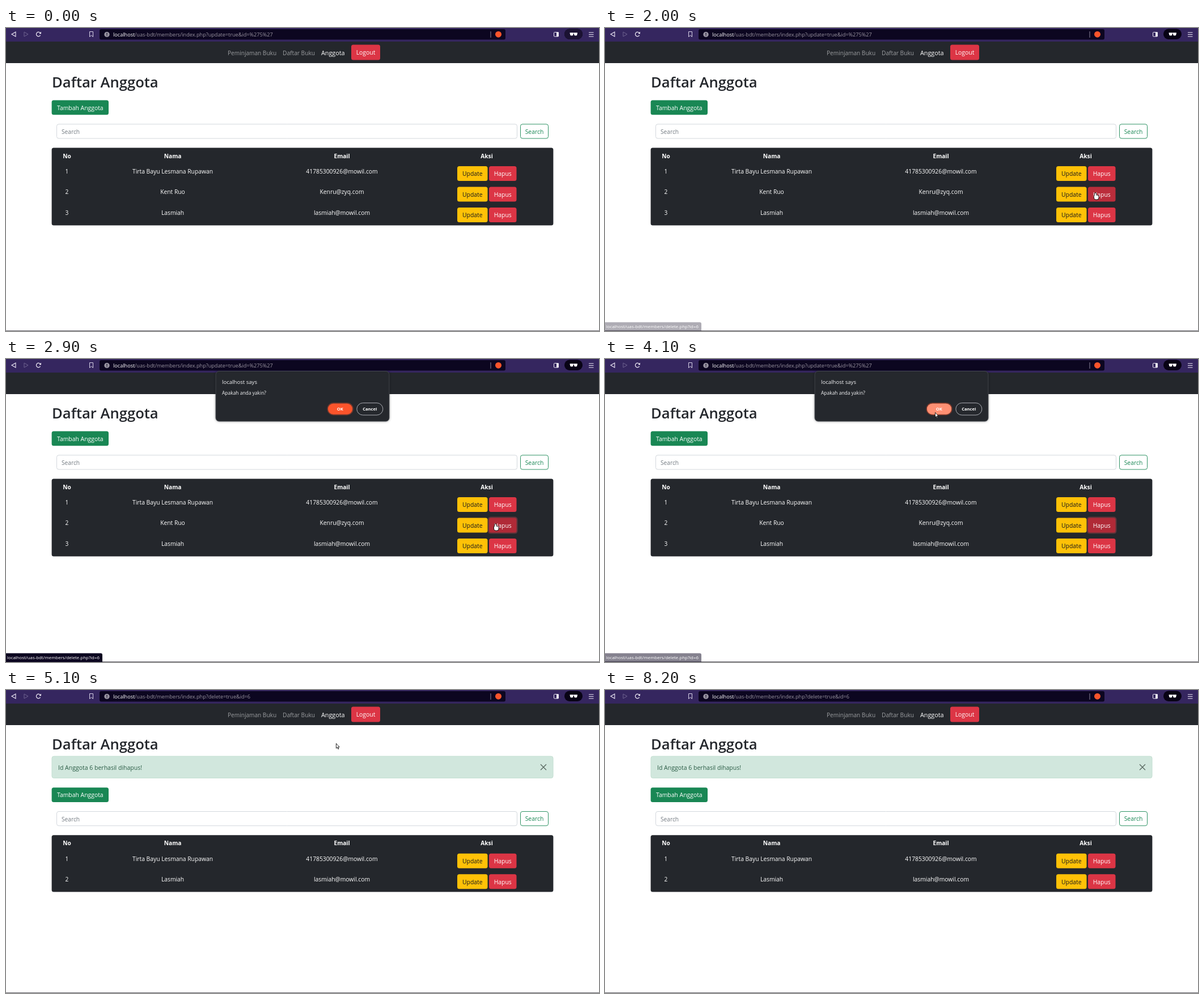
Recreate the animation shown at these times as an HTML page with a canvas. Size 1046x535 px, loop 8.4 s.

```html
<!DOCTYPE html>
<html lang="id">
<head>
<meta charset="utf-8">
<title>Daftar Anggota</title>
<style>
  html, body { margin: 0; width: 100%; height: 100%; overflow: hidden; background: #fff; }
  canvas { display: block; }
</style>
</head>
<body>
<canvas id="stage" width="1046" height="535"></canvas>
<script>
const ctx = document.getElementById('stage').getContext('2d');
const LOOP = 8400, STEP = 100;
const OVER = 1600, PRESS = 2200, CONFIRM = 4800, RELOADED = 5100;
const DARK = '#24272c', RED = '#dc3545', GREEN = '#198754';
const INK = '#0c0620', ORANGE = '#fb542b', ICON = '#eeeaf6';
const ROW = 36.5, BTN_H = 26;
const UPDATE = { label: 'Update', x: 796, w: 53.5, fill: '#ffc107', hover: '#ffca2c', color: '#17191c' };
const DELETE = { label: 'Hapus', x: 852, w: 48.5, fill: RED, hover: '#bb2d3b', color: '#fff' };
const COLS = { No: 107.5, Nama: 294, Email: 592.5, Aksi: 848 };

const members = [
  { name: 'Tirta Bayu Lesmana Rupawan', email: '41785300926@mowil.com' },
  { name: 'Kent Ruo', email: 'Kenru@zyq.com' },
  { name: 'Lasmiah', email: 'lasmiah@mowil.com' }
];

// Stops of the pointer; it slows down towards each one
const stops = [
  { t: 200, x: 28, y: -6 },
  { t: 1000, x: 228, y: 280 },
  { t: OVER, x: 866, y: 291 },
  { t: 2900, x: 862, y: 291 },
  { t: 4000, x: 582, y: 94 },
  { t: 7100, x: 582, y: 94 },
  { t: 7800, x: 48, y: 3 },
  { t: 7900, x: 48, y: 3 },
  { t: 8200, x: 61, y: -10 }
];

const ramp = (t, from, to) => Math.min(1, Math.max(0, (t - from) / (to - from)));

function pointerAt(t) {
  let { x, y } = stops[0];
  for (let i = 1; i < stops.length; i++) {
    const k = 1 - (1 - ramp(t, stops[i - 1].t, stops[i].t)) ** 2;
    x += (stops[i].x - x) * k;
    y += (stops[i].y - y) * k;
  }
  return { x, y };
}

function paint(fill, stroke, line = 1) {
  if (fill) { ctx.fillStyle = fill; ctx.fill(); }
  if (stroke) { ctx.strokeStyle = stroke; ctx.lineWidth = line; ctx.stroke(); }
}

function rect(x, y, w, h, fill) {
  ctx.fillStyle = fill;
  ctx.fillRect(x, y, w, h);
}

function box(x, y, w, h, r, fill, stroke, line) {
  ctx.beginPath();
  ctx.roundRect(x, y, w, h, r);
  paint(fill, stroke, line);
}

function path(d, fill, stroke, line = 1) {
  const p = new Path2D(d);
  if (fill) { ctx.fillStyle = fill; ctx.fill(p); }
  if (stroke) { ctx.strokeStyle = stroke; ctx.lineWidth = line; ctx.stroke(p); }
}

function disc(x, y, r, fill) {
  ctx.beginPath();
  ctx.arc(x, y, r, 0, 7);
  paint(fill);
}

function cross(x, y, r, color, line) {
  path(`M${x - r} ${y - r}L${x + r} ${y + r}M${x - r} ${y + r}L${x + r} ${y - r}`, null, color, line);
}

// y is the middle of the capital letters
function text(s, x, y, size, color, align = 'left', weight = 400) {
  ctx.font = `${weight} ${size}px "Open Sans", "Noto Sans", sans-serif`;
  ctx.textAlign = align;
  ctx.fillStyle = color;
  ctx.fillText(s, x, y + size * .357);
}

function button(label, x, y, w, h, fill, color = '#fff', stroke) {
  box(x, y, w, h, 3.5, fill, stroke, .9);
  text(label, x + w / 2, y + h / 2 + .6, 10.4, color, 'center');
}

function browserBar(t) {
  rect(0, 0, 1046, 24, '#35265f');
  path('M10 11l7 -4v8z', null, ICON, 1.1);
  path('M39 11l-7 -4v8z', null, '#6f6390');
  if (t >= CONFIRM && t < RELOADED) cross(57.5, 11, 3, ICON, 1.2);
  else {
    path('M60.6 12.8A3.8 3.8 0 1 1 60.2 8.6', null, ICON, 1.2);
    path('M62 6.6v3.7h-3.7z', ICON);
  }
  path('M147.5 6.5h6v9l-3 -2.5l-3 2.5z', null, '#d8d2e6');

  box(165, 2, 716, 18.5, 3, INK);
  disc(178, 11.4, 4.7, '#96919f');
  rect(177.4, 8.8, 1.2, 3.2, INK);
  rect(177.4, 12.9, 1.2, 1.2, INK);
  text('localhost', 189, 11.5, 9.15, '#fff');
  const query = t < RELOADED ? 'update=true&id=%275%27' : 'delete=true&id=6';
  text('/uas-bdt/members/index.php?' + query, 227, 11.5, 9.15, '#98939f');
  rect(854.5, 6, 1, 11, '#8c859c');
  disc(868.5, 11.2, 5.5, ORANGE);

  box(966.5, 7.5, 8, 7.5, 1, null, ICON);
  rect(971, 7.5, 4, 7.5, ICON);
  box(985, 1.5, 32, 18.5, 9, '#080315');
  ctx.globalAlpha = 1 - ramp(t, 100, OVER);
  box(985, 1.5, 32, 18.5, 9, '#1b1232');
  ctx.globalAlpha = 1;
  rect(994.5, 8.5, 13.5, 1.5, '#fff');
  for (const x of [995, 1002]) box(x, 8.5, 5.5, 5, [0, 0, 2.5, 2.5], '#fff');
  for (let i = 0; i < 3; i++) rect(1028, 7.5 + 3.5 * i, 8.5, 1, ICON);
}

function navbar() {
  rect(0, 24, 1046, 38, DARK);
  text('Peminjaman Buku', 391, 44, 10.1, '#9b9da0');
  text('Daftar Buku', 488, 44, 10.2, '#9b9da0');
  text('Anggota', 556, 44, 10.8, '#fff');
  button('Logout', 609, 29.5, 51, 27, RED);
}

function page(t, pointer) {
  text('Daftar Anggota', 81, 96, 25.6, DARK, 'left', 600);
  const deleted = t >= RELOADED;
  if (deleted) {
    box(81, 117, 884, 38.5, 3.5, '#d1e7dd', '#c3dfd1');
    text('Id Anggota 6 berhasil dihapus!', 92, 137, 10.5, '#2a5c45');
    cross(948, 136.3, 5, '#596760', 1.3);
  }
  ctx.save();
  if (deleted) ctx.translate(0, 44.7);
  button('Tambah Anggota', 80.6, 127.6, 100.4, 25.7, GREEN);
  box(89.5, 169.8, 812, 25.2, 3.5, '#fff', '#d3d8dd');
  text('Search', 98, 183.2, 10.2, '#747b82');
  button('Search', 907.5, 169.8, 49, 25.2, '#fff', GREEN, GREEN);

  const rows = members.filter((m, i) => !deleted || i !== 1);
  box(80.6, 211.6, 884.8, 27.3 + rows.length * ROW, 3.5, DARK);
  for (const head in COLS) text(head, COLS[head], 226, 10.2, '#fff', 'center', 700);
  rows.forEach((member, i) => memberRow(t, member, i, pointer));
  ctx.restore();
  rect(0, 534, 1046, 1, '#66636b');
}

function memberRow(t, member, i, pointer) {
  const y = 253.2 + i * ROW, top = y - 9.1;
  text(i + 1, COLS.No, y, 10.2, '#fff', 'center');
  text(member.name, COLS.Nama, y, 10.3, '#fff', 'center');
  text(member.email, COLS.Email, y, 10.3, '#fff', 'center');
  const focused = member === members[1] && t >= PRESS;
  if (focused) {
    const late = t >= CONFIRM, g = late ? 2.6 : 2;
    box(DELETE.x - g, top - g, DELETE.w + 2 * g, BTN_H + 2 * g, 5, late ? '#81404a' : '#5d343b');
  }
  for (const b of [UPDATE, DELETE]) {
    const fill = focused && b === DELETE ? '#b02a37' : over(t, b, i, pointer) ? b.hover : b.fill;
    button(b.label, b.x, top, b.w, BTN_H, fill, b.color);
  }
}

function over(t, b, row, { x, y }) {
  const dx = x - b.x, dy = y - 244.1 - row * ROW;
  return t < 3000 && dx > 0 && dx < b.w && dy > 0 && dy < BTN_H;
}

function statusBubble(t) {
  const alpha = ramp(t, 1900, PRESS) * (1 - ramp(t, 3950, 4250));
  if (!alpha) return;
  ctx.globalAlpha = alpha;
  box(0, 519.5, 170, 15.5, [0, 3, 0, 0], INK);
  ctx.globalAlpha = 1;
  text('localhost/uas-bdt/members/delete.php?id=6', 2, 527.3, 7.85, '#fff');
}

function dialog(t) {
  const opened = ramp(t, PRESS, 2400), closing = ramp(t, CONFIRM, 5000);
  const alpha = opened * (1 - ramp(t, 4900, RELOADED));
  if (!alpha) return;
  ctx.save();
  ctx.globalAlpha = alpha;
  ctx.translate(0, -8 * (1 - opened + closing));
  ctx.shadowColor = 'rgba(0,0,0,.5)';
  ctx.shadowBlur = 4;
  box(370, 21.5, 306, 88.5, 6, '#25282d');
  ctx.shadowColor = 'transparent';
  box(370, 21.5, 306, 88.5, 6, null, '#4b4e55', .8);
  text('localhost says', 381, 40.8, 9.6, '#f4f4f6');
  text('Apakah anda yakin?', 381, 60.4, 8.45, '#f4f4f6');
  box(566.4, 77, 46.4, 22.4, 11.2, t < CONFIRM ? '#70382d' : ORANGE);
  box(568, 78.7, 43, 19, 9.5, ORANGE);
  ctx.globalAlpha = alpha * ramp(t, 3900, 4100) * (1 - ramp(t, 4700, CONFIRM));
  box(568, 78.7, 43, 19, 9.5, '#ff9073');
  ctx.globalAlpha = alpha;
  text('OK', 589.3, 88.3, 7.6, '#fff', 'center', 700);
  box(618.8, 77.6, 46, 21.4, 10.7, null, '#a9abb2');
  text('Cancel', 641.7, 88.3, 7.6, '#fff', 'center', 700);
  ctx.restore();
}

function cursor({ x, y }, hand) {
  ctx.save();
  ctx.translate(x, y);
  ctx.lineJoin = 'round';
  if (hand) {
    for (const [fill, stroke] of [[null, '#111'], ['#fff', null]]) {
      box(.2, .4, 2.3, 8, 1.1, fill, stroke, 1.8);
      box(-1, 4.6, 7.6, 7, [1, 2, 3, 3], fill, stroke, 1.8);
    }
  } else path('M.4 .4V9l1.9 -1.7l1.5 3.1l1.2 -.6l-1.5 -3h2.7z', '#fff', '#111', .9);
  ctx.restore();
}

function draw(now) {
  const t = Math.floor((now % LOOP) / STEP) * STEP;
  const pointer = pointerAt(t);
  const hand = members.some((m, i) => over(t, UPDATE, i, pointer) || over(t, DELETE, i, pointer));
  rect(0, 0, 1046, 535, '#fff');
  browserBar(t);
  navbar();
  page(t, pointer);
  statusBubble(t);
  dialog(t);
  if (t >= 200) cursor(pointer, hand);
}

const start = performance.now();
function tick() {
  draw(performance.now() - start);
  requestAnimationFrame(tick);
}
tick();
</script>
</body>
</html>
```
